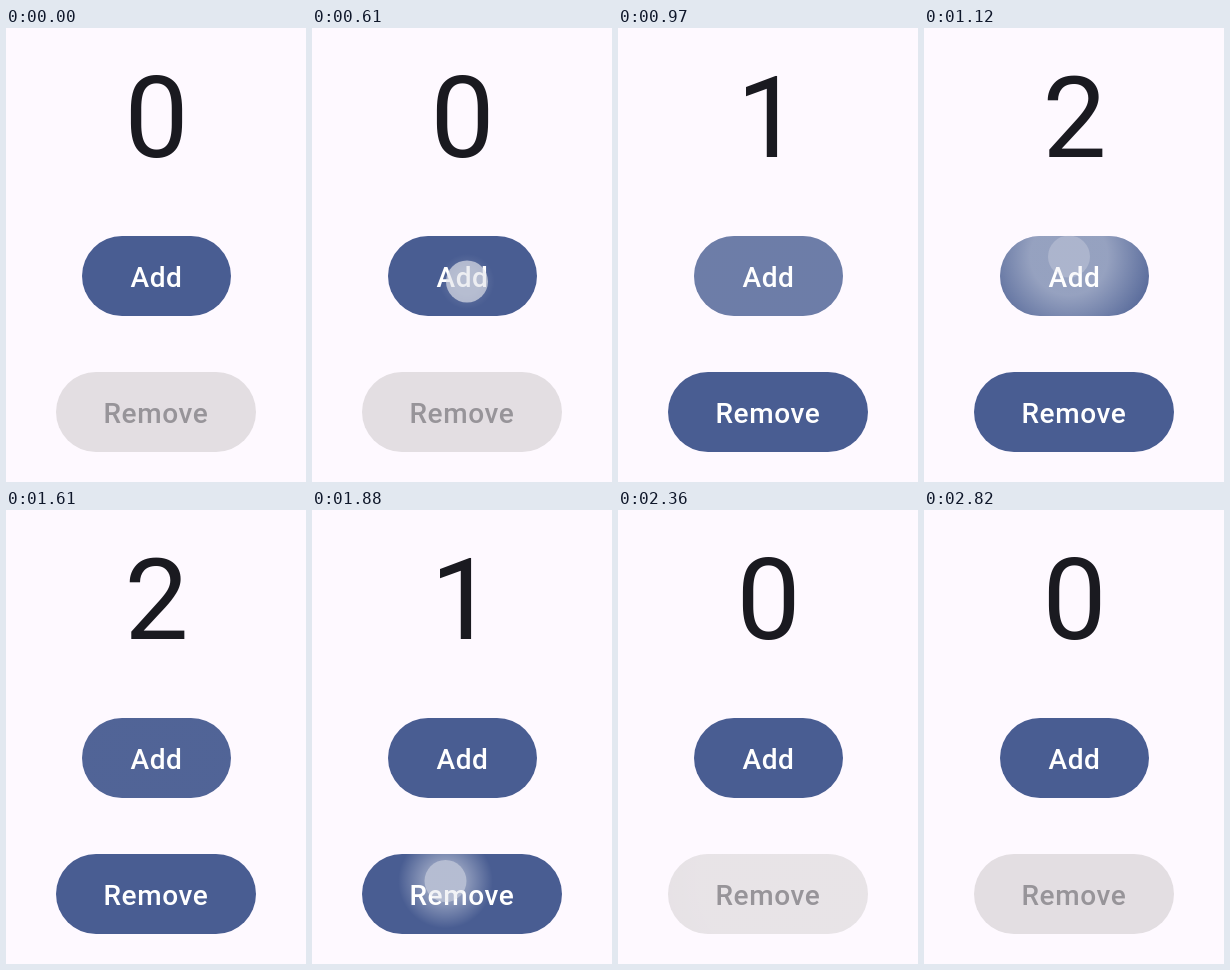
An HTML page with a canvas for the animation above (2850 ms loop, 300 px wide and 454 px high).

```html
<!DOCTYPE html>
<html lang="en">
<head>
<meta charset="utf-8">
<title>Counter</title>
<style>
  html, body { margin: 0; width: 100%; height: 100%; overflow: hidden; background: #fef9ff; }
  canvas { display: block; }
</style>
</head>
<body>
<canvas id="stage" width="300" height="454"></canvas>
<script>
const LOOP = 2850;
const ctx = document.getElementById('stage').getContext('2d');
const clamp = v => Math.max(0, Math.min(1, v));

const add = { label: 'Add', x: 76, y: 208, w: 149, h: 80 };
const remove = { label: 'Remove', x: 50, y: 344, w: 200, h: 80 };
const taps = [
  { at: 590, x: 155, y: 253.5, button: add, step: 1 },
  { at: 1020, x: 145, y: 228.5, button: add, step: 1 },
  { at: 1820, x: 133.5, y: 371, button: remove, step: -1 },
  { at: 2190, x: 173, y: 368.5, button: remove, step: -1 },
];
const CLICK_DELAY = 50;

function text(str, x, y, font, color, spacing) {
  ctx.font = font;
  ctx.letterSpacing = spacing;
  ctx.fillStyle = color;
  ctx.fillText(str, x, y);
}

function drawRipple(tap, t, fade) {
  const age = t - tap.at;
  const alpha = 0.37 * clamp(age / 60) * clamp((650 - age) / 500) * fade;
  if (alpha <= 0) return;
  const radius = 25 + 0.006 * age * age;
  const glow = ctx.createRadialGradient(tap.x, tap.y, 0, tap.x, tap.y, radius);
  glow.addColorStop(0, `rgba(255,255,255,${alpha})`);
  glow.addColorStop(0.45, `rgba(255,255,255,${alpha})`);
  glow.addColorStop(1, 'rgba(255,255,255,0)');
  ctx.fillStyle = glow;
  ctx.fillRect(0, 0, 300, 454);
}

function drawButton(button, enabled, t) {
  const { x, y, w, h, label } = button;
  ctx.save();
  ctx.beginPath();
  ctx.roundRect(x, y, w, h, h / 2);
  ctx.fillStyle = enabled ? '#495d92' : '#e3dee2';
  ctx.fill();
  ctx.clip();
  const fade = button === remove ? clamp((2420 - t) / 140) : 1;
  for (const tap of taps) if (tap.button === button) drawRipple(tap, t, fade);
  ctx.restore();
  text(label, x + w / 2, y + 51, '500 28px Roboto, sans-serif',
    enabled ? '#fff' : '#979499', '0.6px');
}

function drawFinger(tap, t) {
  const age = t - tap.at;
  if (age < 0 || age > 160) return;
  ctx.fillStyle = `rgba(228,230,236,${0.66 * clamp((160 - age) / 140)})`;
  ctx.beginPath();
  ctx.arc(tap.x, tap.y, 21, 0, Math.PI * 2);
  ctx.fill();
}

function draw(t) {
  const count = taps.reduce((n, tap) => n + (t >= tap.at + CLICK_DELAY ? tap.step : 0), 0);
  ctx.fillStyle = '#fef9ff';
  ctx.fillRect(0, 0, 300, 454);
  ctx.textAlign = 'center';
  text(String(count), 150.5, 129, '400 114px Roboto, sans-serif', '#1a1a20', '0px');
  drawButton(add, true, t);
  drawButton(remove, count > 0, t);
  for (const tap of taps) drawFinger(tap, t);
}

function tick() {
  draw(performance.now() % LOOP);
  requestAnimationFrame(tick);
}
tick();
</script>
</body>
</html>
```
